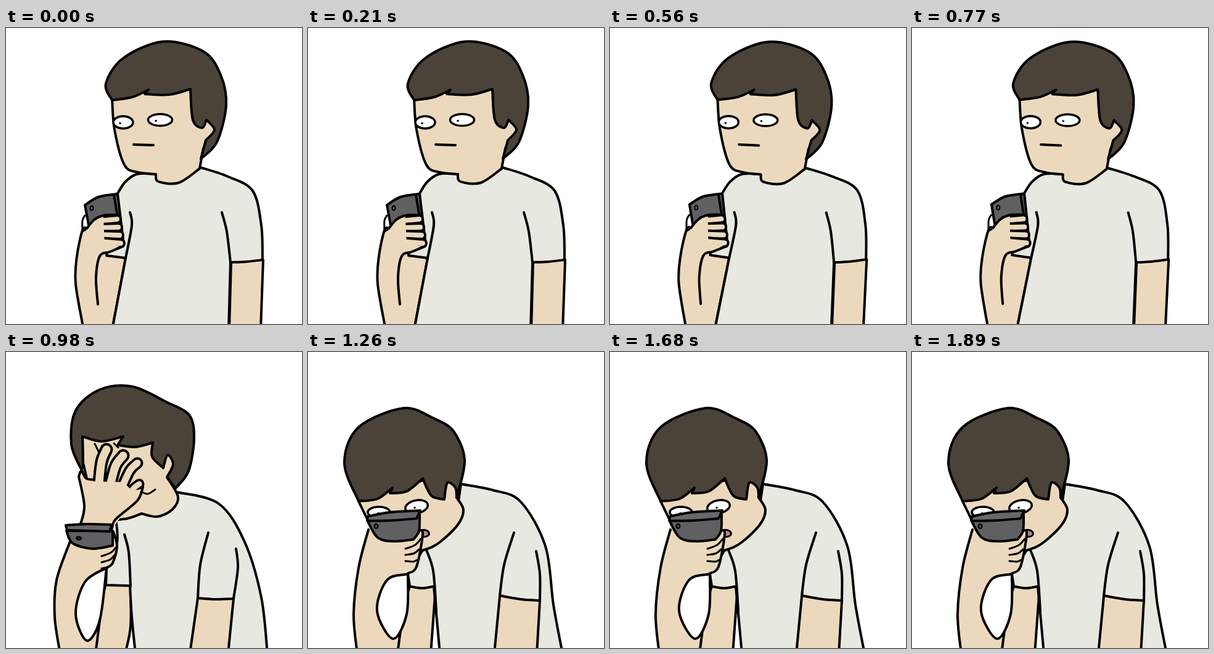
An HTML page with a canvas that plays this animation: 480 px wide and 480 px high, repeating every 1960 ms.

```html
<!DOCTYPE html>
<html>
<head>
<meta charset="utf-8">
<style>
html, body { margin: 0; width: 100%; height: 100%; overflow: hidden; background: #fff; }
canvas { display: block; width: 480px; height: 480px; }
</style>
</head>
<body>
<canvas id="stage" width="480" height="480"></canvas>
<script>
const ctx = document.getElementById('stage').getContext('2d');
const STEP = 70, COUNT = 28, SKIN = '#ecd9bd';
let boil = 0; // 0 draws the clean line, 1 and 2 bend it

function bend([x, y]) {
  if (!boil) return [x, y];
  return [x + 2.4 * Math.cos(y / 130 - 1 + 3 * (boil - 2)), y + 0.8 * Math.sin(x / 50 + boil)];
}

// Smooth curve through key points; "|" makes the point before it a corner.
function trace(text) {
  let last = null;
  ctx.beginPath();
  for (const run of text.split('|')) {
    const p = run.trim().split(/\s+/).map(s => bend(s.split(',').map(Number)));
    if (last) p.unshift(last);
    else ctx.moveTo(...p[0]);
    for (let i = 0; i < p.length - 1; i++) {
      const a = p[i - 1] || p[i], b = p[i], c = p[i + 1], d = p[i + 2] || c;
      ctx.bezierCurveTo(b[0] + (c[0] - a[0]) / 6, b[1] + (c[1] - a[1]) / 6,
        c[0] - (d[0] - b[0]) / 6, c[1] - (d[1] - b[1]) / 6, c[0], c[1]);
    }
    last = p[p.length - 1];
  }
}

function ink(fill, width, color = '#000') {
  if (fill) { ctx.fillStyle = fill; ctx.fill(); }
  if (!width) return;
  ctx.strokeStyle = color;
  ctx.lineWidth = width;
  ctx.stroke();
}

const brush = (fill, width = 4) => text => { trace(text); ink(fill, width); };
const skin = brush(SKIN), patch = brush(SKIN, 0), shirt = brush('#e7e8e0');
const hair = brush('#4b4339'), phone = brush('#606062'), rim = brush('#68686a');
const hole = brush('#fff'), line = brush(null), thin = brush(null, 3);

function finger(text, width) {
  trace(text);
  ink(null, width + 4);
  ink(null, width - 4, SKIN);
}

function oval(fill, x, y, rx, ry = rx, turn = 0, width = 3.5) {
  ctx.beginPath();
  ctx.ellipse(...bend([x, y]), rx, ry, turn, 0, Math.PI * 2);
  ink(fill, width);
}

function eye(x, y, rx, ry, look, turn) {
  oval('#fff', x, y, rx, ry, turn);
  oval('#000', x + look, y + 1.5, 1.3, 1.3, 0, 1);
}

// Folds between the fingers that hold the phone.
function folds(x, y, dx, dy) {
  for (let i = 0; i < 3; i++) {
    const x1 = x - 3 * i, y1 = y + dy * i, x2 = x - dx, y2 = y + 16 + 10 * i;
    thin(`${x1},${y1} ${(x1 + x2) / 2 + 3},${(y1 + y2) / 2 + 2} ${x2},${y2}`);
  }
}

function calm() {
  // arms and shirt
  skin('131,325 124,328 115,370 113,415 126,490 | 172,490 | 194,373');
  skin('365,380 362,490 | 413,490 | 417,376');
  shirt('243,236 212,237 193,250 180,270 | 163,369 | 194,373 | 172,490 | 361,490 | 364,380 | 390,379 416,376 | 414,320 400,264 360,241 315,226');
  line('201,299 204,320 194,373');
  line('350,299 358,330 364,380');
  // head
  skin('172,114 176,165 192,222 214,234 243,237 | 247,249 280,251 314,228 | 320,195 | 345,165 | 300,100');
  eye(190, 153, 16, 10, -5);
  eye(250, 149, 19.5, 9.5, -7);
  line('207,189 239,190');
  hair('172,117 162,90 190,49 255,22 320,38 348,76 357,125 342,185 316,212 | 324,182 | 338,165 325,149 | 318,162 303,149 299,99 | 265,108 225,107 | 231,100 | 205,112 172,117');
  // phone in hand
  thin('128,304 124,312 124,330 | 131,326');
  phone('128,287 150,274 181,269 | 191,352 | 135,325 | 128,287');
  line('175,271 183,318');
  oval('#606062', 139, 292, 2.5, 3.5, 0, 2);
  for (let i = 0; i < 4; i++) finger(`150,${313 + 11 * i} ${180 + 2 * i},${310 + 13 * i}`, 12);
  patch('131,325 143,311 158,306 | 160,350 | 185,353 | 152,370 | 124,345');
  line('131,325 143,311 158,304 176,303');
  line('190,354 168,363 152,370 146,405 149,448');
}

function palm() {
  skin('162,376 | 131,490 | 193,490 | 202,445 202,379');
  shirt('178,270 | 180,310 163,352 | 162,378 | 201,379 | 204,430 210,490 | 424,490 | 414,398 387,308 345,246 276,227 | 245,250');
  line('192,296 199,325 202,380');
  skin('311,399 298,490 | 360,490 | 369,400');
  line('328,293 315,345 311,399 | 340,401 369,400 | 376,350 373,319');
  // head
  skin('124,137 125,180 | 150,265 190,271 220,262 | 245,267 269,256 279,235 261,203 | 282,178 | 236,140');
  hair('124,194 106,150 113,95 152,61 205,56 262,82 | 297,102 305,140 296,193 275,221 | 261,203 | 271,182 262,167 255,188 | 237,170 238,147 | 210,154 181,151 | 190,137 | 155,145 124,137 | 125,188');
  thin('144,149 150,161');
  thin('175,148 182,155');
  thin('218,226 230,230 242,223');
  // hand over the face
  finger('151,212 155,178 163,158', 17);
  finger('170,212 178,184 190,168', 17);
  finger('190,215 201,192 213,180', 15);
  finger('200,230 208,220 216,214', 13);
  patch('120,285 127,250 119,203 | 122,194 | 130,206 145,210 | 190,211 | 205,225 | 221,222 | 195,255 172,288');
  line('120,282 127,250 118,202 | 122,193 130,205 141,207');
  line('222,219 213,241 178,271 172,286');
  // phone arm
  skin('104,307 82,370 79,430 88,490 | 145,490 | 163,350 | 173,342 180,315 174,291');
  hole('163,350 128,373 113,425 131,468 152,435 163,350');
  folds(180, 315, 25, 13);
  phone('98,290 108,310 140,319 173,314 | 173,290 | 98,290');
  rim('97,281 130,279 172,280 | 168,291 | 99,289 | 97,281');
  oval('#222', 118, 302, 4, 2.5, 0.2, 2);
}

function slump() {
  skin('165,380 | 130,490 | 199,490 | 207,380');
  shirt('188,318 | 162,360 | 165,380 | 185,383 204,380 | 214,490 | 413,490 | 398,410 385,315 345,243 300,224 248,214 | 240,270');
  line('192,321 203,355 208,420');
  skin('311,396 302,490 | 371,490 | 376,403');
  line('334,293 318,345 311,395 | 345,401 376,403 | 376,360 370,323');
  // head
  skin('82,242 98,275 | 150,330 | 188,321 213,309 243,280 252,256 241,236 | 246,214 | 226,200 | 130,220');
  eye(115, 260, 18, 9, -1);
  eye(176, 251, 18.5, 10.5, -3, -0.2);
  oval('#bd858a', 188, 294, 8.5, 5.5, 0.1, 3);
  hair('82,242 59,180 82,122 155,91 203,107 | 235,127 254,175 241,236 | 239,220 226,212 221,239 | 200,233 186,205 | 160,226 133,229 | 137,220 | 113,238 82,242');
  // phone arm
  skin('98,288 82,350 74,425 80,490 | 145,490 | 162,359 | 176,348 186,296 181,289');
  hole('162,360 128,370 112,420 138,465 160,425 162,360');
  folds(183, 303, 25, 17);
  phone('96,273 113,301 140,307 171,304 | 180,290 181,262 | 96,273');
  rim('96,267 132,260 182,257 | 176,270 | 140,273 97,274 | 96,267');
  oval('#4a4a4c', 110.5, 282.5, 3, 3.5, 0, 2);
}

function draw(i) {
  const [pose, clean] = i < 12 ? [calm, 0] : i < 15 ? [palm, 2] : [slump, 0];
  boil = (i + 3 - clean) % 3;
  ctx.fillStyle = '#fff';
  ctx.fillRect(0, 0, 480, 480);
  ctx.lineCap = ctx.lineJoin = 'round';
  pose();
}

const start = performance.now();
function tick() {
  draw(Math.floor((performance.now() - start) / STEP) % COUNT);
  requestAnimationFrame(tick);
}
tick();
</script>
</body>
</html>
```
